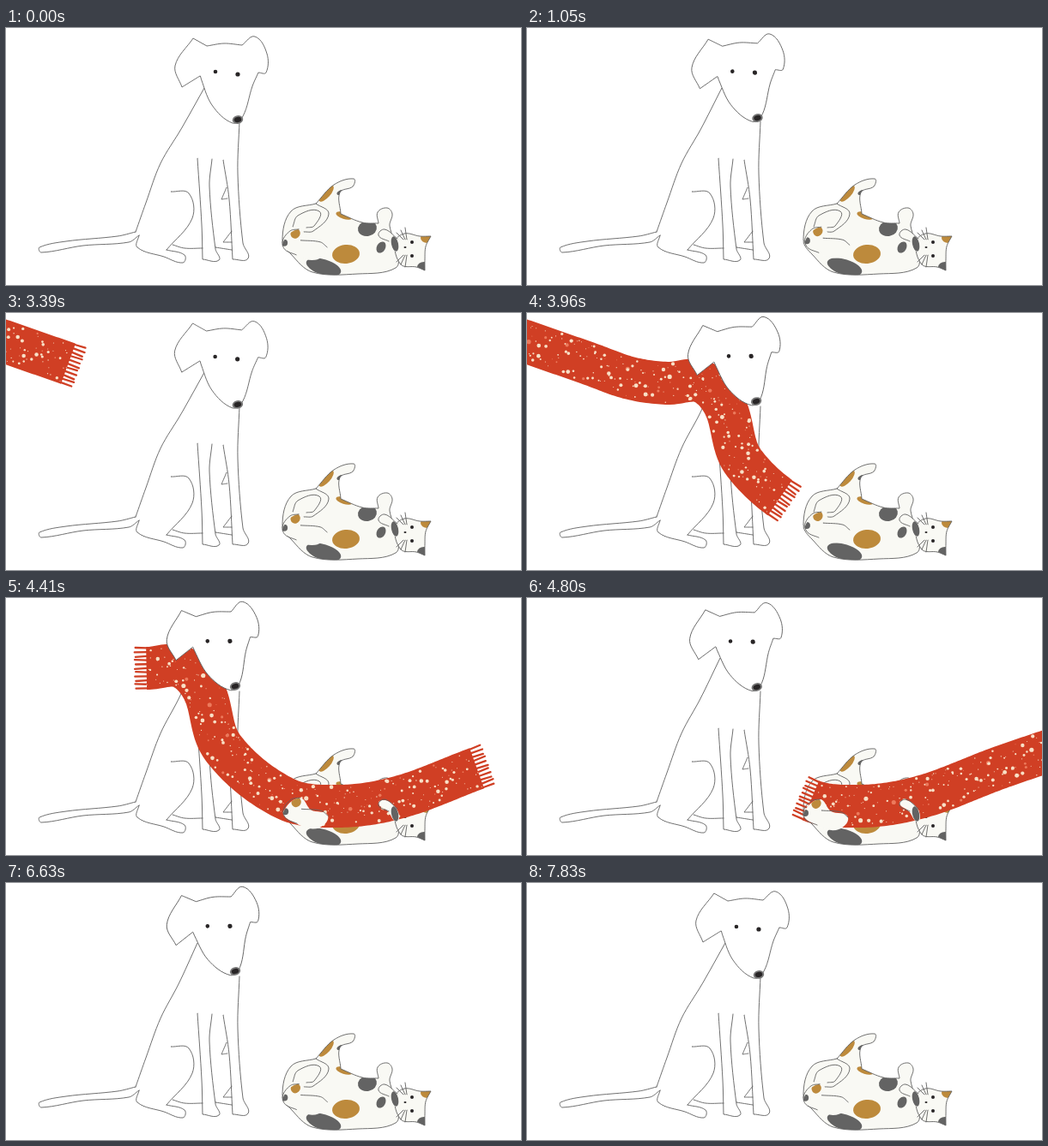
Animation, 600 px wide and 300 px high, one loop 7860 ms. Source, as an HTML page with a canvas:

```html
<!DOCTYPE html>
<html>
<head>
<meta charset="utf-8">
<style>
html, body { margin: 0; width: 100%; height: 100%; overflow: hidden; background: #fff }
canvas { display: block }
</style>
</head>
<body>
<canvas id="stage" width="600" height="300"></canvas>
<script>
const ctx = document.getElementById('stage').getContext('2d');
const LOOP = 7860, SWAY = LOOP / 3, WIGGLE = LOOP / 5;
const LINE = '#606060', FUR = '#f9f9f4', BROWN = '#bd8a3c', GREY = '#636363', RED = '#d03f24', DARK = '#282526';

// Samples a smooth curve through "x,y x,y ..."; a point marked ! is a sharp corner
function smooth(text, closed) {
  const p = text.replace(/(\S+)!/g, '$1 $1').split(' ').map(q => q.split(',').map(Number));
  const n = p.length, out = [];
  const at = i => closed ? p[(i + n) % n] : p[Math.max(0, Math.min(n - 1, i))];
  const gap = (a, b) => Math.hypot(b[0] - a[0], b[1] - a[1]);
  const heading = i => {
    const a = at(i - 1), b = at(i + 1), size = gap(a, b) || 1;
    return [(b[0] - a[0]) / size, (b[1] - a[1]) / size];
  };
  for (let i = 0; i < (closed ? n : n - 1); i++) {
    const a = at(i), b = at(i + 1), da = heading(i), db = heading(i + 1), h = gap(a, b) / 3;
    if (!h) continue;
    for (let u = 0; u < 1; u += 0.125) {
      const v = 1 - u;
      out.push([0, 1].map(k => v ** 3 * a[k] + 3 * v * v * u * (a[k] + da[k] * h)
        + 3 * v * u * u * (b[k] - db[k] * h) + u ** 3 * b[k]));
    }
  }
  if (!closed) out.push(p[n - 1]);
  return out;
}

function path(points, closed) {
  const shape = new Path2D();
  points.forEach(q => shape.lineTo(...q));
  if (closed) shape.closePath();
  return shape;
}
const open = text => path(smooth(text));
const loop = text => path(smooth(text, true), true);

function fill(shape, color) {
  ctx.fillStyle = color;
  ctx.fill(shape);
}
function line(shape) {
  ctx.strokeStyle = LINE;
  ctx.lineWidth = 0.9;
  ctx.stroke(shape);
}
function spot(color, x, y, rx, ry = rx, turn = 0) {
  ctx.beginPath();
  ctx.ellipse(x, y, rx, ry, turn, 0, 7);
  ctx.fillStyle = color;
  ctx.fill();
}
// Fur shape with spots kept inside its outline
function furry(shape, spots) {
  fill(shape, FUR);
  ctx.save();
  ctx.clip(shape);
  spots.forEach(s => spot(...s));
  ctx.restore();
}

const dogBody = [
  '151,238 130,243 70,249 39,256 41,262 90,254 143,250 155,242',
  '155,242 153,256 184,267 206,274 208,265 187,259',
  '192,191 213,193 217,222 187,259',
  '194,253 208,257 229,257',
  '223,152 228,230 229,270! 248,271 244,258 237,185 240,153',
  '253,154 260,200 264,270! 282,269 276,251 270,170 272,109',
  '257,186 251,200! 258,199', '263,237 253,250! 263,250', '244,256 263,259'
].map(open);
const dogHead = loop('226,56! 205,69! 197,44 218,12! 234,21! 254,18 275,20! 290,10 304,30 303,52 294,52! ' +
  '287,68 276,103 264,111 240,90');

const catBody = loop('322,248 332,214 361,205! 382,183 405,176 404,185 389,192 390,217! 415,227 434,228! ' +
  '433,215 444,210 450,217 447,231 456,260 454,280 410,287 357,285 332,264');
const tail = [
  '361,205 376,217 358,237 347,238',
  '334,232 340,219 365,214 359,231 350,233'
].map(open);
const catSpots = [
  [BROWN, 373, 193, 12, 5, -0.85],
  [GREY, 389, 192, 4, 2, -0.6],
  [BROWN, 394, 219, 10, 4, 0.3],
  [GREY, 421, 234, 11, 9, -0.2],
  [BROWN, 396, 264, 16, 11, -0.1],
  [GREY, 370, 279, 21, 9, 0.3],
  [GREY, 437, 256, 5, 7, 0.5]
];
const catHead = loop('453,250 464,240 482,243 495,243! 489,255 488,270 488,283! 478,279 460,276');
const headSpots = [[BROWN, 491, 245, 8, 6], [GREY, 487, 279, 8, 6], [DARK, 473, 250, 2], [DARK, 473, 266, 2]];
const hindLeg = loop('324,249 343,232 356,246 376,253 362,268 333,259');
const hindLines = ['343,232 333,234 324,246 327,256 340,262', '345,245 368,247 376,253'].map(open);
const arm = loop('434,239 445,237 457,250 455,261 445,249');
const armLine = open('446,249 434,242 441,235 456,246');

// Scarf track with cumulative length
const track = smooth('-60,13 72,59 120,76 163,82 203,80 230,107 252,174 325,234 390,243 460,232 548,199 609,178 680,154');
const dist = [0];
for (let i = 1; i < track.length; i++)
  dist[i] = dist[i - 1] + Math.hypot(track[i][0] - track[i - 1][0], track[i][1] - track[i - 1][1]);
const total = dist[dist.length - 1];
const reach = x => dist[track.findIndex(p => p[0] >= x - 0.01)];
const scarfLength = reach(548) - reach(163);

// Point at distance s, moved v across and w along the track
function place(s, v, w = 0) {
  s = Math.max(0, Math.min(total, s));
  const i = Math.max(1, dist.findIndex(d => d >= s)), a = track[i - 1], b = track[i];
  const size = dist[i] - dist[i - 1], tx = (b[0] - a[0]) / size, ty = (b[1] - a[1]) / size;
  const ahead = s - dist[i - 1] + w;
  return [a[0] + tx * ahead - ty * v, a[1] + ty * ahead + tx * v];
}

let seed = 7;
const random = () => (seed = seed * 16807 % 2147483647) / 2147483647;
const dots = Array.from({ length: 300 }, (_, i) => ({
  s: (i + random()) / 300 * scarfLength,
  v: (random() - 0.5) * 46,
  r: 0.5 + 2.1 * random() ** 3,
  color: random() < 0.12 ? '#ec7a5c' : '#f8e0c6'
}));

// Quadratic through three [time, value] pairs
const fit = (t, keys) => keys.reduce((sum, [a, value]) =>
  sum + keys.reduce((m, [b]) => a === b ? m : m * (t - b) / (a - b), value), 0);
const frontKeys = [[3390, reach(72)], [4410, reach(548)], [5220, reach(609) + scarfLength]];

function drawScarf(t) {
  if (t < 3215 || t > 5270) return;
  const front = fit(t, frontKeys), back = front - scarfLength;
  const from = Math.max(0, back), to = Math.min(total, front);
  const upper = [], lower = [];
  for (let s = from; s < to + 3; s += 3) {
    upper.push(place(Math.min(s, to), -25));
    lower.unshift(place(Math.min(s, to), 25));
  }
  fill(path([...upper, ...lower], true), RED);
  ctx.strokeStyle = RED;
  ctx.lineWidth = 2.3;
  for (const [end, way] of [[front, 1], [back, -1]])
    for (let i = 0; i < 11; i++) {
      const v = (i - 5) * 4.7;
      ctx.stroke(path([place(end, v, -way), place(end, v + (i % 3 - 1) * 0.7, way * (12.5 + i % 2))]));
    }
  for (const d of dots) {
    const s = back + d.s;
    if (s > 0 && s < total) spot(d.color, ...place(s, d.v), d.r);
  }
}

// 0: dog looks right, 1: dog looks up left
function tilt(t) {
  const ease = (mid, half) => {
    const u = Math.max(0, Math.min(1, (t % SWAY - mid + half) / (2 * half)));
    return (1 - Math.cos(Math.PI * u)) / 2;
  };
  return ease(1050, 370) - ease(2290, 330);
}

function drawDogBody(k) {
  line(open(`${231 - 8 * k},70 ${204 - 3 * k},118 180,158 163,204 151,238`));
  dogBody.forEach(line);
}

function drawDogHead(k) {
  ctx.save();
  ctx.translate(270 - 3 * k, 107 - 4 * k);
  ctx.rotate(-0.115 * k);
  ctx.translate(-270, -107);
  fill(dogHead, '#fff');
  line(dogHead);
  spot(DARK, 244, 51, 2.3);
  spot(DARK, 270, 54, 2.6);
  spot('#777', 270, 107, 6.3, 4.8, -0.2);
  spot(DARK, 270, 107, 4.3, 3, -0.2);
  ctx.restore();
}

function drawCat() {
  furry(catBody, catSpots);
  line(catBody);
  tail.forEach(line);
  furry(catHead, headSpots);
  line(catHead);
  spot(DARK, 465, 256, 1.5, 1);
  for (const side of [-1, 1])
    for (let i = 0; i < 3; i++)
      line(path([[463 + 2 * i, 256 + side * 9], [455 + 5 * i, 256 + side * (17 + 3 * i)]]));
}

function drawCatLimbs(t) {
  const up = 0.5 - 0.5 * Math.cos(2 * Math.PI * (t / WIGGLE - 0.08));
  ctx.save();
  ctx.translate(2 * up - 2, 3 - 3 * up);
  furry(hindLeg, [[BROWN, 339, 237, 5.5, 6, 0.5], [GREY, 326, 248, 4]]);
  hindLines.forEach(line);
  ctx.restore();
  furry(arm, [[GREY, 453, 252, 4, 9, -0.2]]);
  line(armLine);
}

function draw(t) {
  const k = tilt(t);
  ctx.fillStyle = '#fff';
  ctx.fillRect(0, 0, 600, 300);
  drawDogBody(k);
  drawCat();
  drawScarf(t);
  drawDogHead(k);
  drawCatLimbs(t);
}

const start = performance.now();
function frame() {
  draw((performance.now() - start) % LOOP);
  requestAnimationFrame(frame);
}
ctx.lineCap = ctx.lineJoin = 'round';
frame();
</script>
</body>
</html>
```
